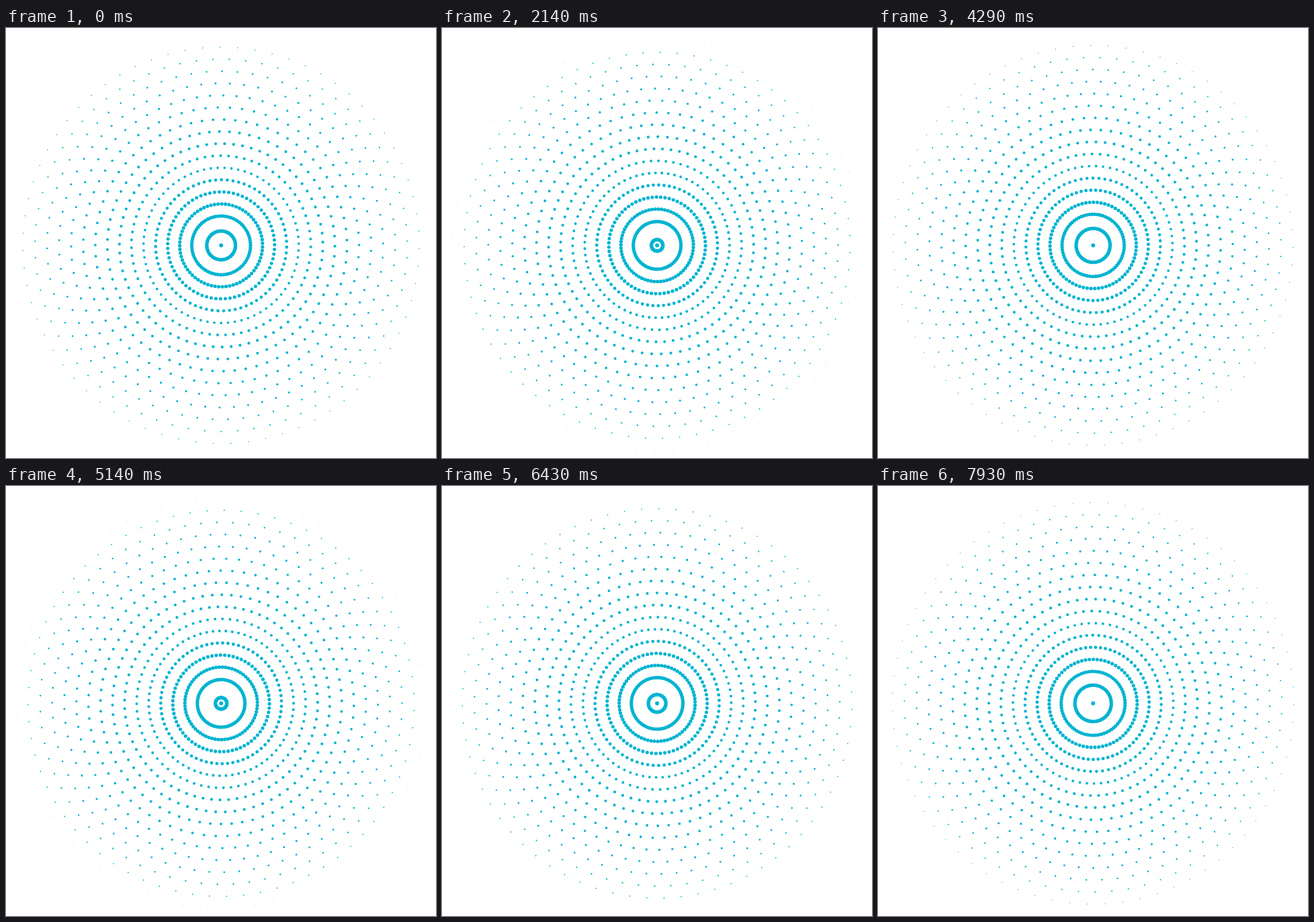
These frames come from a looping animation (640x640 px, 8000 ms). An HTML page with a canvas:

```html
<!DOCTYPE html>
<html>
<head>
<meta charset="utf-8">
<style>
  html, body { margin: 0; width: 100%; height: 100%; overflow: hidden; background: #fff; }
  canvas { display: block; width: 100vmin; height: 100vmin; }
</style>
</head>
<body>
<canvas width="640" height="640"></canvas>
<script>
const ctx = document.querySelector('canvas').getContext('2d');
const TAU = Math.PI * 2;
const CENTER = { x: 320.2, y: 323.5 };
const LOOP = 8000, FPS = 14;
const ARMS = 71;
const RING_GAP = 17.95, RING_TIME = 600;
const FIRST_RING = 295 - 16 * RING_GAP;
const BIRTH = 13.5, EDGE = 312;

// Dot radius along the way out: [distance, size]
const SIZES = [[0, 2.7], [70, 2.6], [97, 2.35], [114, 1.9], [135, 2.1], [150, 2.15],
               [187, 1.95], [241, 1.5], [277, 1.1], [295, 0.8], [EDGE, 0.1]];

function dotSize(distance) {
  const i = SIZES.findIndex(([d]) => d >= distance);
  if (i < 1) return SIZES[0][1];
  const [d0, s0] = SIZES[i - 1], [d1, s1] = SIZES[i];
  return s0 + (s1 - s0) * (distance - d0) / (d1 - d0);
}

// Rings burst from the center, then settle into a constant speed
const ringRadius = travel => travel - 0.0166 * Math.max(0, 42 - travel) ** 2;

// Dots drift along spiral arms while moving outward
const armTwist = radius => (-0.3 - 0.157 * (radius - 295)) * Math.PI / 180;

function dot(x, y, size) {
  ctx.moveTo(x + size, y);
  ctx.arc(x, y, size, 0, TAU);
}

function drawRing(radius) {
  const size = dotSize(radius), twist = armTwist(radius);
  for (let arm = 0; arm < ARMS; arm++) {
    const angle = twist + arm * TAU / ARMS;
    dot(CENTER.x + radius * Math.sin(angle), CENTER.y - radius * Math.cos(angle), size);
  }
}

function draw(time) {
  const step = Math.floor((time + 5) * FPS / 1000);
  const phase = (step * 1000 / FPS / RING_TIME) % 1;
  ctx.clearRect(0, 0, 640, 640);
  ctx.fillStyle = '#00b4d1';
  ctx.beginPath();
  dot(CENTER.x, CENTER.y, 3);
  for (let ring = 0; ring < 18; ring++) {
    const travel = FIRST_RING + (ring + phase) * RING_GAP;
    if (travel > BIRTH && travel < EDGE) drawRing(ringRadius(travel));
  }
  ctx.fill();
}

const start = performance.now();
function tick() {
  draw((performance.now() - start) % LOOP);
  requestAnimationFrame(tick);
}
tick();
</script>
</body>
</html>
```
